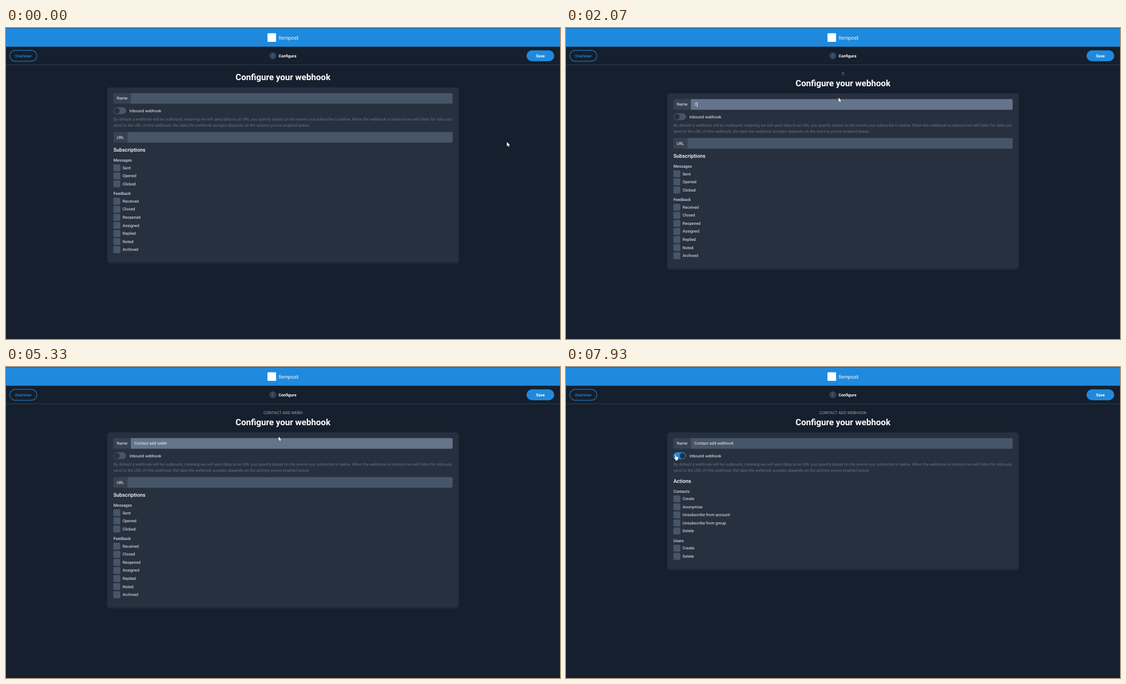
Recreate the animation shown at these times as an HTML page with a canvas. Size 998 by 561 pixels, loop 8000 ms.

```html
<!DOCTYPE html>
<html lang="en">
<head>
<meta charset="utf-8">
<title>Configure your webhook</title>
<style>
html, body { margin: 0; width: 100%; height: 100%; overflow: hidden; background: #151f2d; }
canvas { display: block; }
</style>
</head>
<body>
<canvas id="stage" width="998" height="561"></canvas>
<script>
const ctx = document.getElementById('stage').getContext('2d');
const LOOP = 8000, STEP = 200 / 3, SIZE = 7.28;
const BG = '#151f2d', BLUE = '#1f8add', CARD = '#27303f', LABEL = '#374151',
      FIELD = [71, 85, 105], FOCUS = [100, 116, 139], LIGHT = '#f1f3f6';
const FIELD_CSS = `rgb(${FIELD})`;

const NAME = 'Contact add webhook';
const KEY_TIMES = [2070, 2270, 2400, 2470, 2870, 3130, 3400, 3470, 3670, 3730,
                   3870, 4000, 4130, 4270, 5070, 5330, 5400, 5530, 5600];
const SHIFT_AT = 2070, BLUR_AT = 7670, TOGGLE_AT = 7730;

const OUTBOUND = ['Subscriptions', [
  ['Messages', ['Sent', 'Opened', 'Clicked']],
  ['Feedback', ['Received', 'Closed', 'Reopened', 'Assigned', 'Replied', 'Noted', 'Archived']]]];
const INBOUND = ['Actions', [
  ['Contacts', ['Create', 'Anonymize', 'Unsubscribe from account', 'Unsubscribe from group', 'Delete']],
  ['Users', ['Create', 'Delete']]]];
const HELP = [
  'By default a webhook will be outbound, meaning we will send data to an URL you specify based on the events you subscribe to below. When the webhook is inbound we will listen for data you',
  "send to the URL of this webhook, the data the webhook accepts depends on the actions you've enabled below."];

const clamp = v => Math.max(0, Math.min(1, v));
const progress = (t, from, to) => clamp((t - from) / (to - from));
const ease = p => p * p * (3 - 2 * p);
const lerp = (a, b, p) => a + (b - a) * p;
const mix = (a, b, p) => `rgb(${a.map((v, i) => Math.round(lerp(v, b[i], p)))})`;

function box(x, y, w, h, r, fill) {
  ctx.beginPath();
  ctx.roundRect(x, y, w, h, r);
  ctx.fillStyle = fill;
  ctx.fill();
}

function disc(x, y, r, fill) {
  ctx.beginPath();
  ctx.arc(x, y, r, 0, 7);
  ctx.fillStyle = fill;
  ctx.fill();
}

// y is the middle of the line
function text(str, x, y, { size = SIZE, weight = 400, fill = LIGHT, align = 'left', family = 'Roboto' } = {}) {
  ctx.font = `${weight} ${size}px ${family}, sans-serif`;
  ctx.textRendering = 'geometricPrecision';
  ctx.textAlign = align;
  ctx.fillStyle = fill;
  ctx.fillText(str, x, y + size * 0.342);
  return ctx.measureText(str).width;
}

function drawHeader() {
  box(0, 0, 998, 33.8, 0, BLUE);
  box(0, 0, 998, 1, 0, '#1b5d94');
  box(471, 9.5, 15.5, 15.5, 1, '#fff');
  text('fernpost', 491.5, 17.5, { size: 9.6, family: 'Lato', fill: '#fff' });

  ctx.beginPath();
  ctx.roundRect(6.8, 40.3, 48.8, 19.8, 9.9);
  ctx.strokeStyle = BLUE;
  ctx.lineWidth = 1.04;
  ctx.stroke();
  text('Overview', 31.1, 50.1, { weight: 500, fill: BLUE, align: 'center' });

  disc(480.6, 50.1, 6.3, LABEL);
  text('1', 480.6, 50.1, { size: 8.3, fill: BLUE, align: 'center' });
  text('Configure', 491, 50.1, { weight: 700, fill: '#fff' });
  box(937.7, 40.3, 49.9, 19.7, 9.9, BLUE);
  text('Save', 962.6, 50.1, { weight: 700, fill: '#fff', align: 'center' });
  box(0, 66, 998, 1, 0, '#343c4a');
}

function drawField(label, y, split, fill) {
  box(193.4, y, split - 193.4, 19.2, [2.6, 0, 0, 2.6], LABEL);
  box(split, y, 804.6 - split, 19.2, [0, 2.6, 2.6, 0], fill);
  text(label, 199.5, y + 9.6);
}

function drawToggle(y, p) {
  const track = mix(FIELD, [31, 138, 221], p);
  box(193.4, y - 6.25, 22.9, 12.5, 6.25, track);
  disc(lerp(199.6, 210, p), y, 5.2, CARD);
}

function drawOptions([title, groups], y) {
  text(title, 193.4, y, { size: 9.36, weight: 500, fill: '#fff' });
  y += 18.5;
  groups.forEach(([heading, items], g) => {
    if (g) y += 17.7;
    text(heading, 193.4, y, { weight: 500, fill: '#d2d6dc' });
    y += 13.5;
    items.forEach((item, i) => {
      if (i) y += 14.55;
      box(193.4, y - 6.2, 12.5, 12.5, 1.6, FIELD_CSS);
      text(item, 210, y);
    });
  });
}

function drawCard(top, bottom) {
  ctx.save();
  ctx.shadowColor = 'rgba(40, 70, 105, .45)';
  ctx.shadowBlur = 4;
  ctx.shadowOffsetY = 1.5;
  box(183, top, 632, bottom - top, 4, CARD);
  ctx.restore();
}

function polygon(x, y, points) {
  ctx.beginPath();
  points.forEach(([px, py]) => ctx.lineTo(x + px, y + py));
  ctx.closePath();
  ctx.lineJoin = 'round';
  ctx.lineWidth = 0.9;
  ctx.strokeStyle = '#10151e';
  ctx.stroke();
  ctx.fillStyle = '#fff';
  ctx.fill();
}

const cursors = {
  arrow: (x, y) => polygon(x, y, [[.4, .4], [.4, 8.4], [2.2, 6.8], [3.5, 9.5], [4.8, 8.9], [3.5, 6.3], [5.9, 6.2]]),
  hand: (x, y) => polygon(x, y, [[0, .7], [.8, 0], [1.6, .7], [1.6, 3.6], [4.6, 4.3], [5.6, 5.2], [5.4, 8],
    [4.6, 9.4], [4.6, 10.8], [.6, 10.8], [.4, 9.4], [-2.2, 6.2], [-1.6, 5.4], [0, 6.6]]),
  beam(x, y) {
    box(x - .4, y - 4.7, .9, 9.4, 0, '#9b8b74');
    for (const end of [-5, 4.3]) box(x - 1.6, y + end, 3.3, .7, 0, '#9b8b74');
  }
};

function pointer(t) {
  if (t < SHIFT_AT) {
    const p = ease(progress(t, 0, 870));
    const x = lerp(902, 494, p) - 2 * progress(t, 870, 1000);
    const y = lerp(205, 126, p);
    return { x, y, kind: x < 804 && y < 137 ? 'beam' : 'arrow' };
  }
  if (t < 6980) {
    // An arc that rises over the title before it falls to the switch
    const p = ease(progress(t, 6070, 6930)), q = 1 - p;
    return {
      x: 490.5 * q * q + 800 * p * q + 241 * p * p,
      y: 125 * q * q + 138 * p * q + 167 * p * p,
      kind: 'arrow'
    };
  }
  const p = ease(progress(t, 6930, 7270));
  const x = lerp(241, 196.7, p);
  return { x, y: lerp(167, 157.6, p), kind: x < 217 ? 'hand' : 'arrow' };
}

function caretOn(t) {
  if (t >= BLUR_AT) return false;
  if (t < 2130) return t >= 1000 && t < 1530 || t >= SHIFT_AT;
  return Math.floor((t - 2130) / 533) % 2 === 1;
}

function draw(t) {
  const shift = t >= SHIFT_AT ? 10.92 : 0;
  const inbound = t >= TOGGLE_AT;
  const mouse = pointer(t);
  const typed = NAME.slice(0, KEY_TIMES.filter(k => t >= k).length);
  const focus = t < SHIFT_AT ? +(mouse.kind === 'beam') : 1 - progress(t, BLUR_AT - 60, BLUR_AT + 130);

  box(0, 0, 998, 561, 0, BG);
  drawHeader();
  text(typed.toUpperCase(), 499, 82.9, { fill: '#9fa6b2', align: 'center' });
  text('Configure your webhook', 499, 89.1 + shift, { size: 15.6, weight: 700, fill: '#fff', align: 'center' });

  drawCard(107.2 + shift, inbound ? 364.5 : 422.6 + shift);
  drawField('Name', 117.4 + shift, 225, mix(FIELD, FOCUS, focus));
  const width = text(typed, 231.3, 127 + shift);
  if (caretOn(t)) box(231.3 + width, 122.3 + shift, .8, 9.4, 0, '#fff');

  drawToggle(149.2 + shift, ease(progress(t, TOGGLE_AT - 60, 7930)));
  text('Inbound webhook', 222.3, 149.2 + shift);
  HELP.forEach((line, i) => text(line, 193.4, 165 + 10.92 * i + shift, { fill: '#69717f' }));

  if (inbound) {
    drawOptions(INBOUND, 205.6);
  } else {
    drawField('URL', 187.6 + shift, 219, FIELD_CSS);
    drawOptions(OUTBOUND, 220.1 + shift);
  }
  cursors[mouse.kind](mouse.x, mouse.y);
}

const start = performance.now();
function tick() {
  const t = (performance.now() - start) % LOOP;
  // The picture advances 15 times per second
  draw(Math.round(Math.floor((t + 4) / STEP) * STEP / 10) * 10);
  requestAnimationFrame(tick);
}
tick();
</script>
</body>
</html>
```
